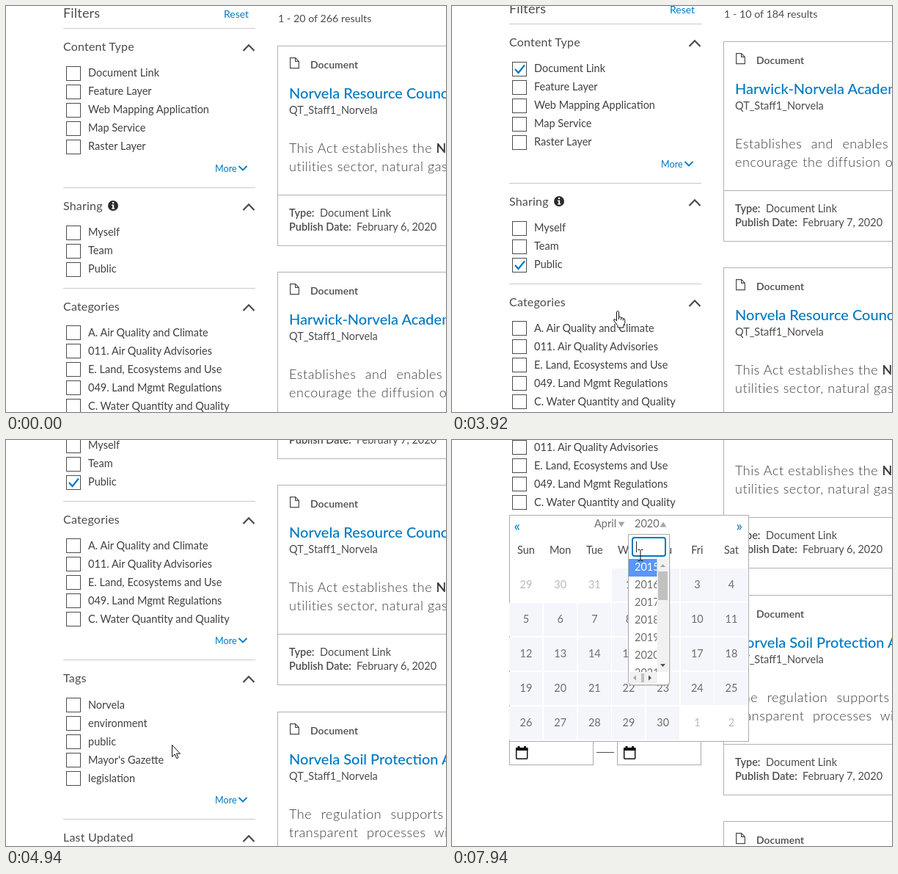
An HTML page for the animation above (8000 ms loop, 600 px wide and 553 px high).

```html
<!DOCTYPE html>
<html lang="en">
<head>
<meta charset="utf-8">
<title>Filter panel</title>
<style>
html, body { margin: 0; width: 100%; height: 100%; overflow: hidden; background: #fff; }
svg { display: block; width: 100vw; height: 100vh; }
text { font: 400 14.5px Lato, "Open Sans", sans-serif; fill: #4c4c4c; white-space: pre; }
.filters { font-size: 18px; letter-spacing: .2px; }
.head { font-size: 16px; letter-spacing: .2px; }
.blue { font-size: 14px; fill: #0079c1; }
.more { font-size: 12.6px; fill: #0079c1; }
.count { font-size: 14.3px; }
.label { fill: #404040; }
.kind { font-size: 14px; font-weight: 600; }
.title { font-size: 20px; font-weight: 500; fill: #0079c1; }
.body { font-size: 18px; font-weight: 300; letter-spacing: .55px; fill: #3c3c3c; }
.bold { font-weight: 600; }
.nav { font-size: 20px; fill: #0079c1; }
.cal { fill: #6e6e6e; }
.mid { text-anchor: middle; }
.day { fill: #484848; }
.out { fill: #b9b9b9; }
.pick { fill: #fff; }
.rule { stroke: #cacaca; }
.box { fill: #fff; stroke: #4c4c4c; }
.card { fill: #fff; stroke: #b2b2b2; }
.ring { fill: none; stroke: #101010; stroke-width: 2; }
.line { fill: none; stroke: #4c4c4c; }
</style>
</head>
<body>
<svg id="stage" viewBox="0 0 600 553"></svg>
<script>
const text = (x, y, s, cls, extra = '') => `<text x="${x}" y="${y}" class="${cls}" ${extra}>${s}</text>`;
const rect = (x, y, w, h, attrs) => `<rect x="${x}" y="${y}" width="${w}" height="${h}" ${attrs}/>`;
const path = (d, attrs) => `<path d="${d}" ${attrs}/>`;
const group = (id, body) => `<g id="${id}">${body}</g>`;

// Filter column
const rule = y => path(`M78 ${y + .5}H340`, 'class="rule"');
const head = (y, s) => text(78, y + 5, s, 'head') +
  path(`M323.5 ${y + 5}l7.5-7.7 7.5 7.7`, 'class="line" stroke-width="2.3"');
const rows = (top, drop, labels) => labels.map((s, i) =>
  rect(82.5, top + 25 * i + .5, 19, 19, 'class="box"') +
  text(112, top + 25 * i + drop, s, 'label')).join('');
const more = y => text(285, y + 5, 'More', 'more') +
  path(`M317.5 ${y - 3}l5.5 5.5 5.5-5.5`, 'fill="none" stroke="#0079c1" stroke-width="1.8"');
const check = (id, top) => group(id, path(`M86 ${top + 10}l4.5 5 8.5-10.5`,
  'fill="none" stroke="#0079c1" stroke-width="2.2"'));
const ring = (id, top) => group(id, rect(80, top - 2, 24, 24, 'rx="2" class="ring"'));
const dateBox = x => rect(x + .5, 869.5, 114, 33, 'fill="#fff" stroke="#a9a9a9"') +
  rect(x + 9.7, 879.7, 15, 14.6, 'rx="1" fill="none" stroke="#111" stroke-width="1.5"') +
  path(`M${x + 9} 879h16.5v4h-16.5zM${x + 11.5} 877h3v3h-3zM${x + 20} 877h3v3h-3z`, 'fill="#111"');

const panel = text(78, 16, 'Filters', 'filters') + text(297, 16, 'Reset', 'blue') +
  [30, 247, 384, 600, 817].map(rule).join('') +
  head(56, 'Content Type') +
  rows(82, 14, ['Document Link', 'Feature Layer', 'Web Mapping Application', 'Map Service', 'Raster Layer']) +
  more(221) +
  head(273, 'Sharing') + '<circle cx="146" cy="272" r="7" fill="#2b2b2b"/>' +
  path('M145 267h2.2v2h-2.2zM144 270.5h3.2v4.5h1v1.5h-4v-1.5h1v-3h-1.2z', 'fill="#fff"') +
  rows(299, 14, ['Myself', 'Team', 'Public']) +
  head(410, 'Categories') +
  rows(435, 15, ['A. Air Quality and Climate', '011. Air Quality Advisories', 'E. Land, Ecosystems and Use',
    '049. Land Mgmt Regulations', 'C. Water Quantity and Quality']) +
  more(574) +
  head(626, 'Tags') +
  rows(652, 15, ['Norvela', 'environment', 'public', "Mayor's Gazette", 'legislation']) +
  more(791) +
  head(843, 'Last Updated') + dateBox(78) + dateBox(225) +
  path('M197 885.5H221', 'class="line"') +
  check('check1', 82) + check('check2', 349) + ring('ring1', 82) + ring('ring2', 349) +
  group('focus', rect(78, 869, 115, 34, 'rx="2" class="ring"'));

// Result cards: title, day, two lines with their word spacing
const council = ['Norvela Resource Council Act', 6,
  'This Act establishes the <tspan class="bold">Norvela</tspan>', 0, 'utilities sector, natural gas', 0];
const academy = ['Harwick-Norvela Academy Act', 7, 'Establishes and enables', 7, 'encourage the diffusion of', 1];
const soil = ['Norvela Soil Protection Act', 7, 'The regulation supports', 7, 'transparent processes with', 6];
const card = ([title, day, a, gapA, b, gapB], i) => {
  const y = Math.round(54 + 308.33 * i);
  return rect(370.5, y + .5, 300, 272, 'class="card"') +
    path(`M371 ${y + 203.5}H600`, 'stroke="#b2b2b2"') +
    path(`M387.6 ${y + 16.6}h7l4.8 4.8v9.2h-11.8zM394.6 ${y + 16.6}v4.8h4.8`, 'class="line" stroke-width="1.2"') +
    text(415, y + 31, 'Document', 'kind') + text(386, y + 72, title, 'title') +
    text(386, y + 93, 'QT_Staff1_Norvela', '') +
    text(386, y + 146, a, 'body', `word-spacing="${gapA}"`) +
    text(386, y + 171, b, 'body', `word-spacing="${gapB}"`) +
    text(386, y + 233, 'Type:', 'bold') + text(428, y + 233, 'Document Link', '') +
    text(386, y + 252, 'Publish Date:', 'bold') + text(478, y + 252, `February ${day}, 2020`, '');
};
const cards = items => items.map(card).join('');

// Calendar, April 2020
const colX = c => 101 + 46.67 * c;
const triangle = (x, y, dy) => path(`M${x - 4.5} ${y - dy}h9l-4.5 ${2 * dy}z`, 'fill="#a6a6a6"');
const weekdays = ['Sun', 'Mon', 'Tue', 'Wed', 'Thu', 'Fri', 'Sat'];
const days = Array.from({ length: 35 }, (_, i) => {
  const n = i - 2, off = n < 1 || n > 30;
  const x = colX(i % 7), y = 197 + 47 * Math.floor(i / 7);
  return (off ? '' : rect(Math.round(x - 22.7), y - 22, 45, 45, 'fill="#f4f6fb"')) +
    text(x, y + 5, n < 1 ? n + 31 : off ? n - 30 : n, off ? 'cal mid out' : 'cal mid');
}).join('');
const calendar = rect(78.5, 102.5, 326, 308, 'fill="#fff" stroke="#adadad"') +
  text(84.5, 124, '«', 'nav') + text(387.5, 124, '»', 'nav') +
  text(194, 119, 'April', 'cal') + triangle(231, 115, 3.5) + text(249, 119, '2020', 'cal') +
  group('shut', triangle(288, 115, 3.5)) + group('open', triangle(288, 115, -3.5)) +
  weekdays.map((d, c) => text(colX(c), 155, d, 'mid day')).join('') + days;

// Year list with its scroll bars
const years = Array.from({ length: 7 }, (_, i) =>
  text(249, 178 + 24 * i, 2015 + i, i ? 'cal' : 'pick')).join('');
const yearList = rect(241.5, 130, 56, 205, 'rx="4" fill="#000" opacity=".12"') +
  path('M240.5 128.5H296.5V329.5q0 4-4 4H244.5q-4 0-4-4z', 'fill="#fff" stroke="#aaa"') +
  rect(246, 133, 45, 25, 'rx="3" fill="#fff" stroke="#0079c1" stroke-width="2"') +
  `<g clip-path="url(#rows)">${rect(241, 162, 39, 24, 'fill="#5897fb"')}${years}</g>` +
  rect(280, 162, 15, 154, 'fill="#f1f1f1"') + rect(281, 179, 13, 39, 'fill="#c1c1c1"') +
  path('M284 173h7l-3.5-4z', 'fill="#a3a3a3"') + path('M284 305h7l-3.5 4z', 'fill="#505050"') +
  rect(242, 316, 38, 16, 'fill="#f1f1f1"') + rect(258, 318, 4, 12, 'fill="#c1c1c1"') +
  path('M251 320.5v7l-4-3.5z', 'fill="#a3a3a3"') + path('M268 320.5v7l4-3.5z', 'fill="#505050"') +
  group('caret', path('M251.5 138V153', 'stroke="#222"'));

const skin = 'fill="#fff" stroke="#111" stroke-linejoin="round"';
const pointer =
  group('arrow', path('M.5 .5V16.5l3.7-3.5 2.5 5.7 2.3-1-2.5-5.5H11.5z', skin)) +
  group('hand', path('M-1.5 1.5Q0-.8 1.5 1.5V9l1-.8q1.8 0 2 1.6 2.2-1 2.7 1 2.5-.6 2.6 2V16.5L8 20V23H0V20.5L-5 14Q-6 11-3.6 11.5L-1.5 14Z', skin) +
    path('M1.5 9v3M4.5 10v2.5M7.2 11v2.5', 'stroke="#111"')) +
  group('beam', path('M-3.5-7.5H-1L0-6.5 1-7.5H3.5M0-6.5V6.5M-3.5 7.5H-1L0 6.5 1 7.5H3.5', 'fill="none" stroke="#111"'));

const stage = document.getElementById('stage');
stage.innerHTML = '<defs><clipPath id="rows"><rect x="241" y="162" width="38.5" height="154"/></clipPath></defs>' +
  group('page',
    panel + group('count1', text(371, 22, '1 - 20 of 266 results', 'count')) +
    group('count2', text(371, 22, '1 - 10 of 184 results', 'count')) +
    group('cards1', cards([council, academy])) +
    group('cards2', cards([academy, council, soil, soil]))) +
  group('calendar', calendar) + group('list', yearList) + group('pointer', pointer);

const el = {};
stage.querySelectorAll('g[id]').forEach(g => { el[g.id] = g; });

// Visible spans in ms
const spans = {
  ring1: [1450, 1530], check1: [1530, 8000], ring2: [2920, 3000], check2: [3000, 8000],
  count1: [0, 1990], count2: [1990, 8000], cards1: [0, 3230], cards2: [3230, 8000],
  focus: [6000, 7470], calendar: [6080, 8000], shut: [0, 7470], open: [7470, 8000],
  list: [7470, 8000], caret: [7550, 8000]
};
const shapes = [[0, 'arrow'], [3620, 'hand'], [4160, 'arrow'], [5090, 'beam'], [5540, 'arrow'],
  [7320, 'hand'], [7860, 'beam']];
// Pointer moves: start, end, steps, x, y, sideways bow
const moves = [
  [220, 440, 4, 122, 176, 0], [680, 900, 4, 93, 100, 0], [1140, 1300, 3, 93, 96, 0],
  [1910, 2690, 11, 92, 366, -13], [3460, 3620, 3, 226, 415, 0], [5460, 5610, 3, 95, 439, 0],
  [6000, 6390, 6, 85, 438, 0], [6540, 6700, 3, 115, 157, 0], [6780, 7320, 8, 257, 115, 0],
  [7780, 7940, 3, 257, 157, 0]
];

const clamp = v => Math.min(1, Math.max(0, v));
const smooth = v => { v = clamp(v); return v * v * (3 - 2 * v); };
const stepped = (t, t0, t1, n) =>
  t < t0 ? 0 : clamp((Math.floor((t - t0) / (t1 - t0) * (n - 1) + .15) + 1) / n);

function scrollAt(t) {
  const a = smooth((stepped(t, 3850, 4550, 10) - .13) / .845);
  const b = smooth((stepped(t, 4940, 5310, 6) - .13) / .735);
  return Math.round(300 * a + 160 * b);
}

function pointerAt(t) {
  let x = 544, y = 580;
  for (const [t0, t1, n, nx, ny, bow] of moves) {
    const p = smooth(stepped(t, t0, t1, n));
    x += (nx - x) * p + bow * Math.sin(Math.PI * p);
    y += (ny - y) * p;
  }
  return [Math.round(x), Math.round(y)];
}

function draw(now) {
  const t = now % 8000;
  for (const id in spans) el[id].style.display = t >= spans[id][0] && t < spans[id][1] ? '' : 'none';
  const shape = shapes.filter(s => t >= s[0]).pop()[1];
  for (const id of ['arrow', 'hand', 'beam']) el[id].style.display = id === shape ? '' : 'none';
  el.page.setAttribute('transform', `translate(0 ${-scrollAt(t)})`);
  el.pointer.setAttribute('transform', `translate(${pointerAt(t)})`);
}

const start = performance.now();
function loop() {
  draw(performance.now() - start);
  requestAnimationFrame(loop);
}
loop();
</script>
</body>
</html>
```
